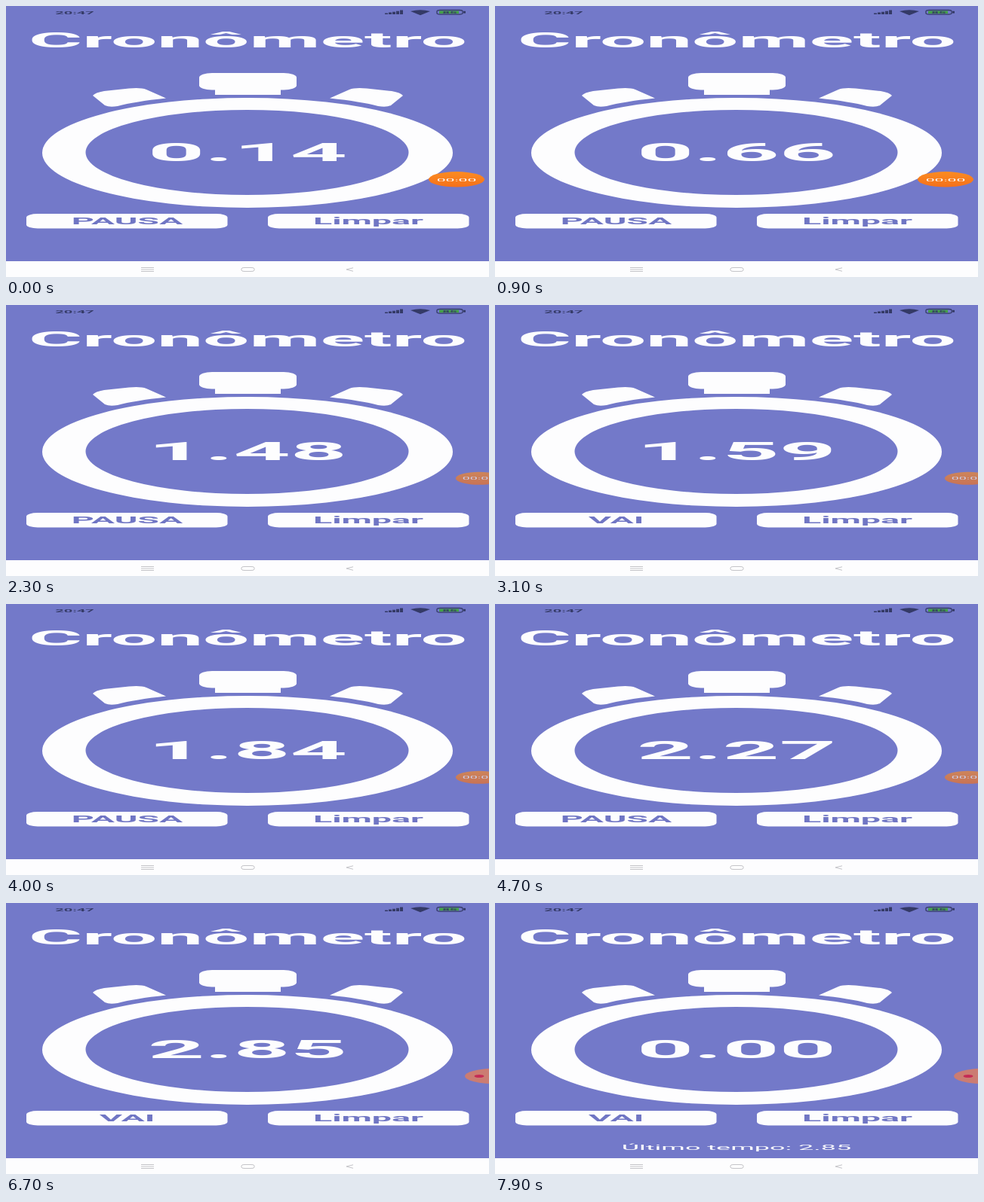
An HTML page for the animation above (8000 ms loop, 640 by 360 pixels).

```html
<!DOCTYPE html>
<html lang="pt">
<head>
<meta charset="utf-8">
<title>Cronômetro</title>
<style>
  html, body { margin: 0; width: 100%; height: 100%; overflow: hidden; background: #7379c9; }
  svg { display: block; width: 640px; height: 360px; }
  text { font-family: Roboto, sans-serif; font-weight: 700; text-anchor: middle; }
  .white { fill: #fdfdfe; }
  .ink { fill: #343a66; }
  .label { fill: #7076c4; font-size: 12.1px; }
  .thin { font-weight: 400; }
  .nav { fill: none; stroke: #c4c4c8; stroke-width: 1; }
</style>
</head>
<body>
<svg viewBox="0 0 640 360">
  <defs>
    <linearGradient id="orange" x2="0" y2="1">
      <stop offset="0" stop-color="#fb8c22"/>
      <stop offset="1" stop-color="#f5701a"/>
    </linearGradient>
  </defs>
  <rect width="640" height="360" fill="#7379c9"/>

  <!-- status bar -->
  <g class="ink">
    <g transform="translate(91 10.8) scale(3.85 1)"><text font-size="5.2">20:47</text></g>
    <path d="M502 9.5h4v1.5h-4zM507 8.6h4v2.4h-4zM512 7.7h4v3.3h-4zM517 6.7h4v4.3h-4zM522 5.6h4v5.4h-4z"/>
    <path d="M536 7Q549 3.5 562 7L549 12.3Z"/>
    <rect x="606" y="6.8" width="3" height="2.8"/>
    <rect x="571" y="5.5" width="34" height="5.6" rx="4" ry="1.5" fill="none" stroke="#343a66" stroke-width="1.3"/>
    <rect x="574" y="6.5" width="26" height="3.6" fill="#43a047"/>
    <g transform="translate(588 10) scale(3.85 1)"><text font-size="4.4">85</text></g>
  </g>

  <g class="white">
    <g transform="translate(320.5 55) scale(3.85 1)"><text font-size="28.2">Cronômetro</text></g>

    <!-- stopwatch -->
    <path fill-rule="evenodd" d="M48 195a272 73 0 0 1 544 0a272 73 0 0 1-544 0zM105.500 194.500a214 56.500 0 0 0 428 0a214 56.500 0 0 0-428 0z"/>
    <rect x="256" y="89" width="129" height="22.500" rx="17" ry="6"/>
    <rect x="277" y="108" width="87" height="10"/>
    <path id="ear" d="M115 119Q118 115 130 113L163 109.600Q178 108 186 111L212 122.500Q170 127 148 133Q137 135 131 132Z"/>
    <use href="#ear" transform="matrix(-1 0 0 1 641 0)"/>

    <rect x="27" y="276" width="266.500" height="19.500" rx="15" ry="5"/>
    <rect x="347" y="276" width="266.500" height="19.500" rx="15" ry="5"/>
    <g transform="translate(320 206.300) scale(3.85 1)"><text id="time" font-size="34.1">0.14</text></g>
    <g transform="translate(320 327.700) scale(3.85 1)"><text id="last" class="thin" font-size="9.35">Último tempo: 2.85</text></g>
    <rect y="339" width="640" height="21"/>
  </g>

  <g transform="translate(160.500 290.200) scale(3.85 1)"><text id="go" class="label">PAUSA</text></g>
  <g transform="translate(480 290.200) scale(3.85 1)"><text class="label">Limpar</text></g>

  <!-- navigation bar -->
  <path class="nav" d="M179 347.500h17M179 350h17M179 352.500h17M460 347.800L451 350L460 352.300"/>
  <rect class="nav" x="312" y="347.500" width="17" height="5" rx="4" ry="1.500" stroke-width="1.500"/>

  <!-- floating recorder -->
  <g id="bubble">
    <ellipse rx="37" ry="10.200" fill="url(#orange)"/>
    <g transform="translate(0 2.500) scale(3.85 1)"><text id="rec" class="white thin" font-size="5.5">00:00</text></g>
  </g>
  <g id="dock">
    <ellipse cx="646" cy="230" rx="38" ry="10" fill="#cb7c72"/>
    <ellipse cx="627" cy="230" rx="6.500" ry="2" fill="#c62c55"/>
  </g>
</svg>
<script>
  const LOOP = 8000, STEP = 100;
  const RESET = 7100, DOCK = 4800;
  const runs = [
    [0, 1700, 0.14, 1.13], [1700, 2480, 1.13, 1.59],
    [3590, 4000, 1.59, 1.84], [4000, 5400, 1.84, 2.69], [5400, 5660, 2.69, 2.85]
  ];
  const el = id => document.getElementById(id);
  const [time, go, last, bubble, rec, dock] = ['time', 'go', 'last', 'bubble', 'rec', 'dock'].map(el);
  const clamp = x => Math.min(1, Math.max(0, x));
  const mix = (a, b, k) => a + (b - a) * k;
  const show = (node, on) => node.setAttribute('visibility', on ? 'visible' : 'hidden');

  function elapsed(t) {
    if (t >= RESET) return 0;
    const [from, to, a, b] = runs.filter(r => r[0] <= t).pop();
    return mix(a, b, clamp((t - from) / (to - from)));
  }

  function draw(now) {
    const t = Math.floor(now % LOOP / STEP) * STEP;
    const running = runs.some(([from, to]) => t >= from && t < to);
    time.textContent = elapsed(t).toFixed(2);
    go.textContent = running ? 'PAUSA' : 'VAI';
    show(last, t >= RESET);

    const k = clamp((t - 1000) / 300);
    bubble.setAttribute('transform', `translate(${mix(597, 627, k)} 230.3) scale(${mix(1, 0.84, k)})`);
    bubble.setAttribute('opacity', mix(1, 0.66, k));
    rec.textContent = '00:0' + Math.floor(t * 0.0006);
    show(bubble, t < DOCK);
    show(dock, t >= DOCK);
  }

  function tick() {
    draw(performance.now());
    requestAnimationFrame(tick);
  }
  tick();
</script>
</body>
</html>
```
